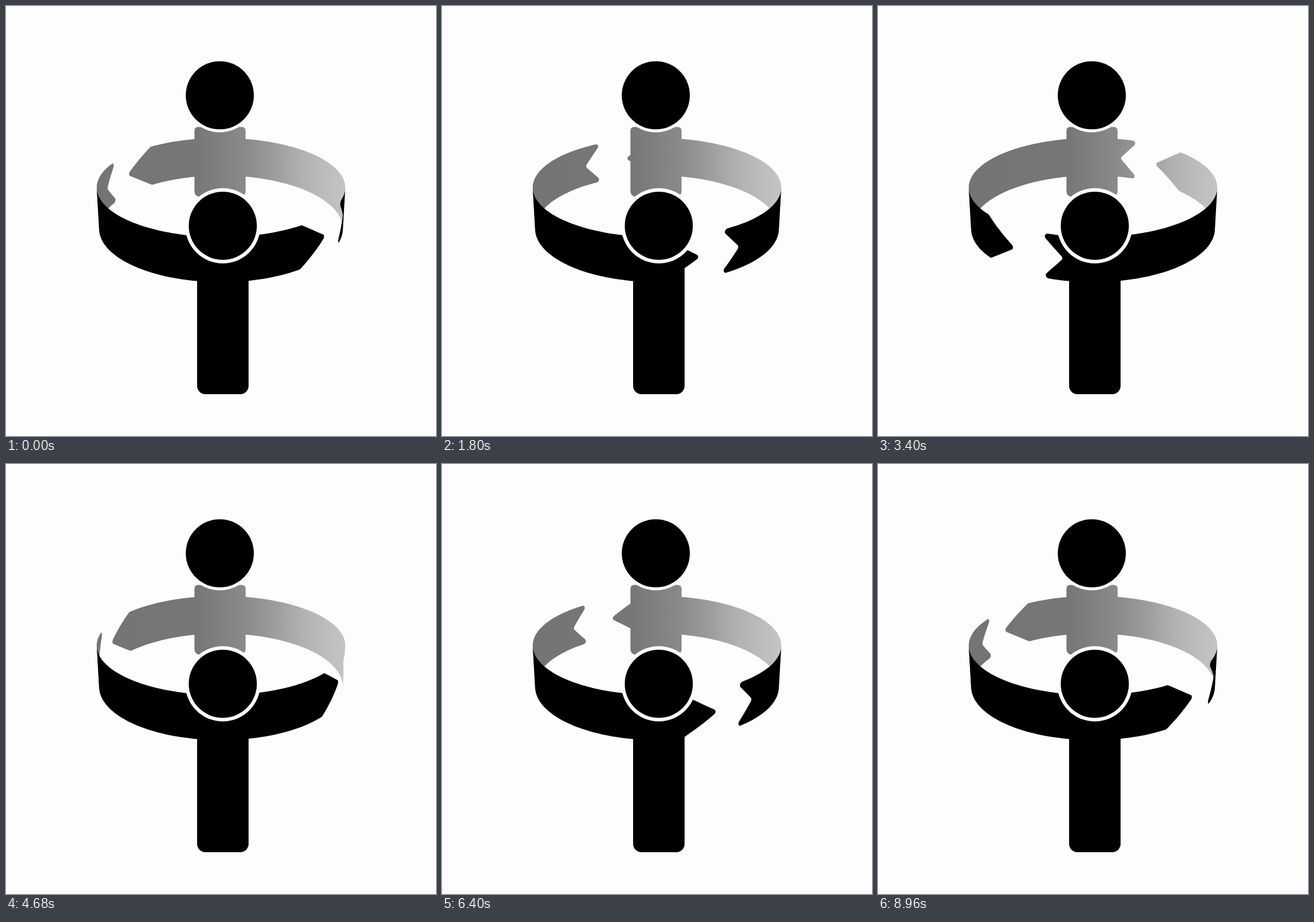
Recreate the animation shown at these times as an HTML page with a canvas. Size 720 px wide and 720 px high, loop 9000 ms.

```html
<!DOCTYPE html>
<html lang="en">
<head>
<meta charset="utf-8">
<title>Two figures and turning arrows</title>
<style>
  html, body { margin: 0; width: 100%; height: 100%; overflow: hidden; background: #fdfdfd; }
  canvas { display: block; width: 720px; height: 720px; }
</style>
</head>
<body>
<canvas id="stage" width="720" height="720"></canvas>
<script>
const ctx = document.getElementById('stage').getContext('2d');
const LOOP = 9000, STEP = 40, TURN = 4500;
const PAPER = '#fdfdfd', INK = '#000';
const RAD = Math.PI / 180;

// Ring and camera; angle 0 is the far side, growing to the left.
const R = 204.7, H = 37.7, DIST = 1630, CX = 360, CY = 329;
const SIN = 0.4155, COS = Math.sqrt(1 - SIN * SIN);
const EDGE = 180 - Math.acos(R / (DIST * COS)) / RAD;

const shade = ctx.createLinearGradient(152, 0, 569, 0);
[[152, '#747474'], [320, '#777777'], [400, '#8a8a8a'],
 [440, '#999999'], [500, '#b3b3b3'], [569, '#c5c5c5']]
  .forEach(([x, color]) => shade.addColorStop((x - 152) / 417, color));

function project(angle, v) {
  const z = -R * Math.cos(angle * RAD);
  const scale = DIST / (DIST - v * SIN - z * COS);
  return [CX - R * Math.sin(angle * RAD) * scale, CY - (v * COS - z * SIN) * scale];
}

const mix = (p, q, k) => [p[0] + (q[0] - p[0]) * k, p[1] + (q[1] - p[1]) * k];

// Flat arrow outline as [degrees, height] with circular corners, finely divided.
function roundedOutline(corners, radius) {
  const n = corners.length;
  const flat = corners.map(([angle, v]) => [angle * RAD * R, v]);
  const arcs = flat.map((p, i) => {
    const prev = flat[(i + n - 1) % n], next = flat[(i + 1) % n];
    const [ax, ay, bx, by] = [prev[0] - p[0], prev[1] - p[1], next[0] - p[0], next[1] - p[1]];
    const la = Math.hypot(ax, ay), lb = Math.hypot(bx, by);
    const half = Math.acos((ax * bx + ay * by) / (la * lb)) / 2;
    const cut = radius / Math.tan(half), weight = Math.sin(half);
    const a = mix(p, prev, cut / la), b = mix(p, next, cut / lb);
    return Array.from({ length: 13 }, (_, j) => {
      const s = j / 12, k = 1 - s, m = 2 * k * s * weight, sum = k * k + m + s * s;
      return [0, 1].map(c => (k * k * a[c] + m * p[c] + s * s * b[c]) / sum);
    });
  });
  const out = [];
  arcs.forEach((arc, i) => {
    out.push(...arc);
    const from = arc[12], to = arcs[(i + 1) % n][0];
    const parts = Math.ceil(Math.abs(to[0] - from[0]) / 7);
    for (let j = 1; j < parts; j++) out.push(mix(from, to, j / parts));
  });
  return out.map(([u, v]) => [u / R / RAD, v]);
}

const arrow = roundedOutline(
  [[54.6, 0], [38.3, -H], [-114.2, -H], [-104.4, 0], [-114.2, H], [38.3, H]], 5);

// Angles outside the visible range collapse onto its edge.
function drawArrows(turn, from, to, fill) {
  ctx.fillStyle = fill;
  for (const offset of [0, 178.1])
    for (const wrap of [-360, 0, 360]) {
      const shift = turn + offset + wrap;
      if (shift + 55 < from || shift - 115 > to) continue;
      ctx.beginPath();
      for (const [angle, v] of arrow)
        ctx.lineTo(...project(Math.min(to, Math.max(from, angle + shift)), v));
      ctx.fill();
    }
}

function disc(x, y, r, fill) {
  ctx.fillStyle = fill;
  ctx.beginPath();
  ctx.arc(x, y, r, 0, 2 * Math.PI);
  ctx.fill();
}

function block(x, y, w, h, radii, fill) {
  ctx.fillStyle = fill;
  ctx.beginPath();
  ctx.roundRect(x, y, w, h, radii);
  ctx.fill();
}

function draw(ms) {
  const turn = Math.floor(ms % LOOP / STEP) * STEP % TURN / TURN * 360;
  ctx.fillStyle = PAPER;
  ctx.fillRect(0, 0, 720, 720);

  drawArrows(turn, -EDGE, EDGE, shade);
  block(315.5, 202.5, 85.7, 117, [6, 6, 9, 9], shade);
  disc(358, 149.5, 62, PAPER);
  disc(358, 149.5, 57, INK);

  drawArrows(turn, EDGE, 360 - EDGE, INK);
  block(320, 421, 86.2, 229, [6, 6, 14, 14], INK);
  disc(363, 368, 63, PAPER);
  disc(363, 368, 57, INK);
}

const start = performance.now();
function tick() {
  draw(performance.now() - start);
  requestAnimationFrame(tick);
}
tick();
</script>
</body>
</html>
```
